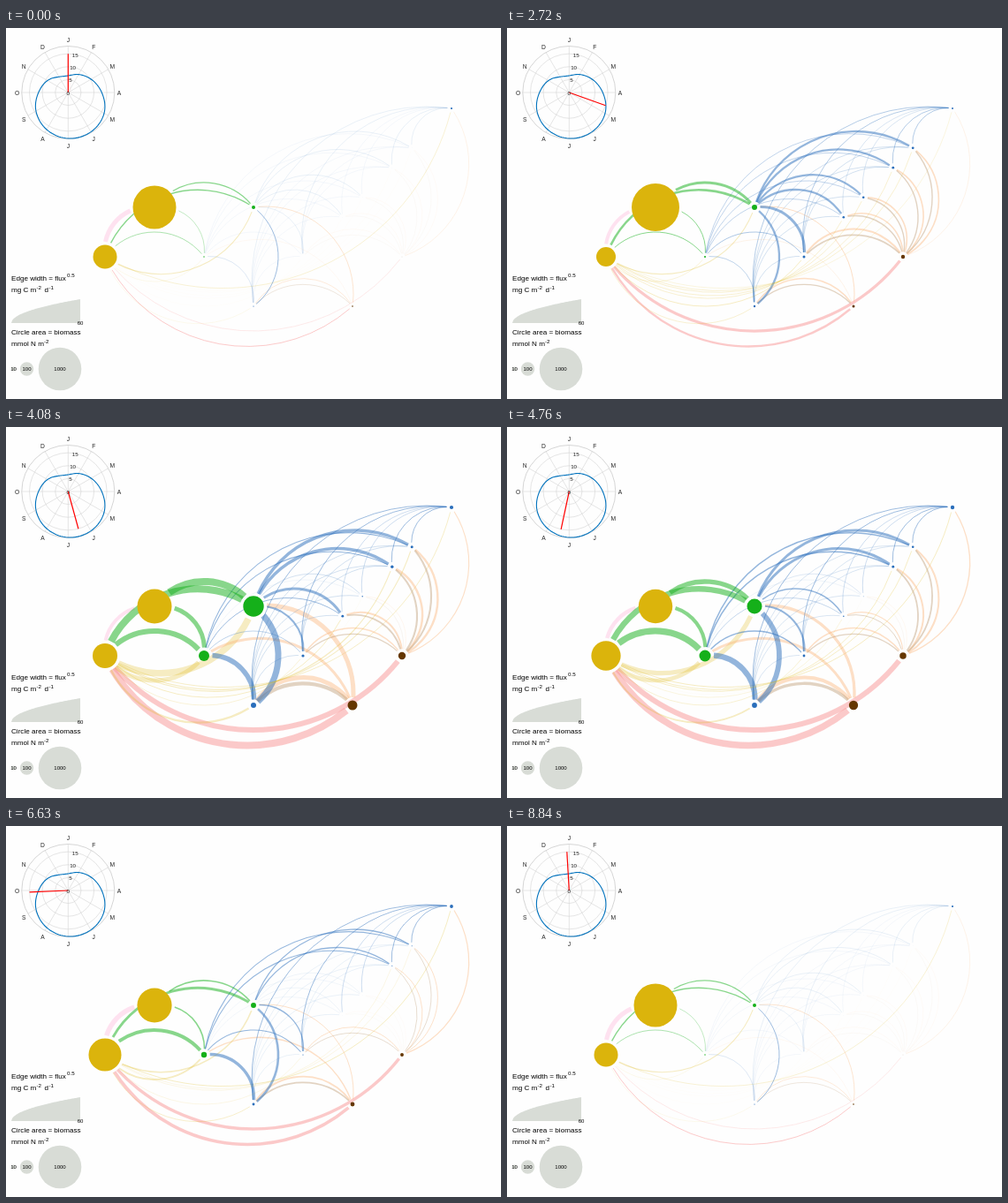
An HTML page with a canvas for the animation above (9010 ms loop, 560 by 420 pixels).

```html
<!DOCTYPE html>
<html lang="en">
<head>
<meta charset="utf-8">
<title>Seasonal food web</title>
<style>
  html, body { margin: 0; height: 100%; overflow: hidden; background: #fefefe; }
  canvas { display: block; }
</style>
</head>
<body>
<canvas id="stage" width="560" height="420"></canvas>
<script>
const ctx = document.getElementById('stage').getContext('2d');
const STEP = 170, STEPS = 53, TAU = Math.PI * 2;
const KEYS = [0, 8, 16, 24, 32, 44, 52];
const CX = 70.3, CY = 73;

const COLORS = {
  nutrient: '#dbb40c', plant: '#15b01a', grazer: '#2a6ebb', detritus: '#653700',
  uptake: 'rgba(21,176,26,.5)', grazing: 'rgba(42,110,187,.5)',
  nitrify: 'rgba(255,129,192,.22)', decay: 'rgba(250,150,150,.5)',
  excrete: 'rgba(219,180,12,.25)', egest: 'rgba(249,180,120,.42)',
  mortality: 'rgba(185,150,110,.42)', legend: '#d8dcd6'
};

// x, y, kind, radius at each key
const NODES = {
  N1: [112, 259, 'nutrient', [13.5, 11.5, 11, 14, 19.3, 18]],
  N2: [168, 203, 'nutrient', [24.5, 27, 27, 19.5, 19, 20]],
  G1: [224, 259, 'plant', [.7, .8, 1, 6, 7, .5]],
  G2: [280, 203, 'plant', [2, 2.5, 3, 11.7, 5.3, 1.3]],
  Z1: [280, 315, 'grazer', [.6, .5, 1.2, 3, 2.8, .5]],
  Z2: [336, 259, 'grazer', [.1, .1, 1.5, 1.6, 1.2, .2]],
  Z3: [380.8, 214.2, 'grazer', [.1, .1, 1.3, 1.4, .1, .1]],
  Z4: [403.2, 191.8, 'grazer', [.1, .1, 1.3, .7, .1, .1]],
  Z5: [436.8, 158.2, 'grazer', [.1, .1, 1.4, 1.7, 1.2, .1]],
  Z6: [459.2, 135.8, 'grazer', [.1, .1, 1.4, 1.5, 1.1, .1]],
  Z7: [504, 91, 'grazer', [1.1, .7, 1, 2.1, 2.3, 1.6]],
  B1: [392, 315, 'detritus', [.8, .8, 1.5, 5.5, 4.8, .7]],
  B2: [448, 259, 'detritus', [.2, .2, 2.2, 4.2, 3.3, 1]]
};

const GRAZING = {
  Z1: [.9, .7, 2.3, 7, 4.6, 1.2],
  Z2: [.2, .5, 3, 2, 2.4, .5],
  Z3: [.2, .5, 2.3, 3, .2, .1],
  Z4: [.2, .4, 2.3, .4, .2, .1],
  Z5: [.2, .5, 2.3, 3.5, 2.3, .6],
  Z6: [.2, .4, 2.3, 3.5, 2.3, .6]
};
const SMALL_SHARE = [.5, .2, .25, .3, .85, .7];
const TOP_PREDATION = [.2, .25, .7, .9, .9, .9];
const MINOR_PREDATION = [.1, .1, .4, .4, .3, .1];

const edges = [];
const link = (color, from, to, width, bend = .25) => edges.push({ color, from, to, width, bend });
const scale = (series, k) => series.map((v, i) => v * (k.length ? k[i] : k));

link('nitrify', 'N1', 'N2', [5, 4.5, 4, 4, 5, 6]);
link('decay', 'B1', 'N1', [1, 1.4, 2.4, 8, 7, 1.3]);
link('decay', 'B2', 'N1', [.4, .2, 3.3, 6, 6, 1.6]);
link('excrete', 'G1', 'N1', [.3, .3, .6, 5, 4, .4]);
link('excrete', 'G2', 'N1', [1.1, 1.3, 1.2, 7.5, 3, .6]);
link('excrete', 'Z7', 'N1', [.7, .2, .5, .9, 1.1, .9]);
link('egest', 'G1', 'B1', [.2, .2, .4, 3, 3, .2]);
link('egest', 'G2', 'B1', [.8, 1.1, 1, 5, 1.6, .5]);
link('egest', 'Z7', 'B2', [.4, .2, .4, 1.1, 1.6, .9]);
link('grazing', 'G1', 'Z1', [.3, .2, .6, 5.5, 6.8, .8]);
for (const z in GRAZING) {
  const first = z === 'Z1', flux = GRAZING[z], sink = first ? 'B1' : 'B2';
  link('excrete', z, 'N1', scale(flux, .32));
  link('egest', z, sink, scale(flux, .7), .28);
  link('mortality', z, sink, scale(flux, .6), .22);
  link('grazing', 'G2', z, flux);
  link('grazing', z, 'Z7', scale(TOP_PREDATION, z === 'Z3' || z === 'Z4' ? .5 : 1));
  if (!first) {
    link('grazing', 'G1', z, scale(flux, SMALL_SHARE));
    link('grazing', 'Z1', z, MINOR_PREDATION);
  }
  if (z > 'Z4') link('grazing', 'Z2', z, MINOR_PREDATION);
}
link('uptake', 'N1', 'G1', [.7, .6, 1, 6, 8.5, .8]);
link('uptake', 'N1', 'G2', [1.4, 2.1, 2.6, 8, 5, 1.4]);
link('uptake', 'N2', 'G1', [.5, .5, 1, 5, 3.2, .4]);
link('uptake', 'N2', 'G2', [1.2, 2.2, 3, 8, 2.6, 1.1]);

// Value of a seasonal series at a step; the last key equals the first
function sample(series, step) {
  let i = 0;
  while (i < KEYS.length - 2 && step >= KEYS[i + 1]) i++;
  const p = (step - KEYS[i]) / (KEYS[i + 1] - KEYS[i]);
  const a = series[i], b = series[(i + 1) % series.length];
  return a + (b - a) * p;
}

function disc(x, y, r, color) {
  ctx.fillStyle = color;
  ctx.beginPath();
  ctx.arc(x, y, r, 0, TAU);
  ctx.fill();
}

function text(str, x, y, size = 8.1, align = 'left', color = '#000') {
  ctx.font = `${size}px "Liberation Sans", Arial, sans-serif`;
  ctx.textAlign = align;
  ctx.fillStyle = color;
  ctx.fillText(str, x, y);
}

function drawEdge({ color, from, to, width, bend }, step) {
  const [ax, ay, , ra] = NODES[from], [bx, by, , rb] = NODES[to];
  const dx = bx - ax, dy = by - ay, chord = Math.hypot(dx, dy);
  const radius = chord * (1 / (8 * bend) + bend / 2);
  const offset = radius / chord - bend;
  const cx = (ax + bx) / 2 - dy * offset, cy = (ay + by) / 2 + dx * offset;
  const trim = r => (sample(r, step) + 3.5) / radius;
  ctx.strokeStyle = COLORS[color];
  ctx.lineWidth = sample(width, step);
  ctx.beginPath();
  ctx.arc(cx, cy, radius,
    Math.atan2(ay - cy, ax - cx) + trim(ra), Math.atan2(by - cy, bx - cx) - trim(rb));
  ctx.stroke();
}

function polar(degrees, rx, ry = rx) {
  const a = degrees * Math.PI / 180;
  return [CX + rx * Math.sin(a), CY - ry * Math.cos(a)];
}

function line(a, b, color, width) {
  ctx.strokeStyle = color;
  ctx.lineWidth = width;
  ctx.beginPath();
  ctx.moveTo(...a);
  ctx.lineTo(...b);
  ctx.stroke();
}

const LIGHT = [19, 23.5, 30, 38, 47, 51.5, 52, 48.5, 42, 33.5, 27, 20.5];

function drawDial(step) {
  ctx.lineWidth = .6;
  for (const r of [14.6, 29.2, 43.8, 52.5]) {
    ctx.strokeStyle = r > 50 ? '#bbb' : '#d4d4d4';
    ctx.beginPath();
    ctx.arc(CX, CY, r, 0, TAU);
    ctx.stroke();
  }
  [...'JFMAMJJASOND'].forEach((month, i) => {
    line([CX, CY], polar(i * 30, 52.5), '#d4d4d4', .6);
    const [x, y] = polar(i * 30, 57.8, 60);
    text(month, x, y + 2.8, 6.7, 'center', '#262626');
  });

  ctx.strokeStyle = '#0072bd';
  ctx.lineWidth = 1.1;
  ctx.beginPath();
  for (let d = 0; d < 360; d += 3) {
    const i = Math.floor(d / 30), t = d / 30 - i;
    const [a, b, c, e] = [11, 0, 1, 2].map(k => LIGHT[(i + k) % 12]);
    const r = b + t / 2 * (c - a + t * (2 * a - 5 * b + 4 * c - e + t * (3 * (b - c) + e - a)));
    ctx.lineTo(...polar(d, r));
  }
  ctx.closePath();
  ctx.stroke();

  line([CX, CY], polar(step * 6.86, 43.8), '#f00', 1.2);
  [0, 5, 10, 15].forEach(v => {
    const [x, y] = polar(10.5, v * 2.92);
    text(v, x, y + 2.6, 6.2, 'center', '#262626');
  });
}

function drawLegend() {
  text('Edge width = flux', 6, 286);
  text('0.5', 69, 282, 6.2);
  text('mg C m', 6, 299);
  text('-2', 34.5, 295.5, 6.2);
  text('d', 43.5, 299);
  text('-1', 48.5, 295.5, 6.2);

  ctx.fillStyle = COLORS.legend;
  ctx.beginPath();
  ctx.moveTo(6, 334);
  for (let x = 0; x <= 78; x++) ctx.lineTo(6 + x, 334 - 27 * Math.sqrt(x / 78));
  ctx.lineTo(84, 334);
  ctx.fill();
  text('60', 84, 336, 6, 'center');

  text('Circle area = biomass', 6, 347);
  text('mmol N m', 6, 360);
  text('-2', 43, 356.5, 6.2);
  [[8.5, 10], [23.5, 100], [61, 1000]].forEach(([x, amount]) => {
    disc(x, 386, 24.3 * Math.sqrt(amount / 1000), COLORS.legend);
    text(amount, x, 388, 6, 'center');
  });
}

function draw(now) {
  const step = Math.floor(now / STEP) % STEPS;
  ctx.fillStyle = '#fefefe';
  ctx.fillRect(0, 0, 560, 420);
  edges.forEach(edge => drawEdge(edge, step));
  for (const [x, y, kind, radius] of Object.values(NODES)) disc(x, y, sample(radius, step), COLORS[kind]);
  drawDial(step);
  drawLegend();
  requestAnimationFrame(draw);
}
requestAnimationFrame(draw);
</script>
</body>
</html>
```
